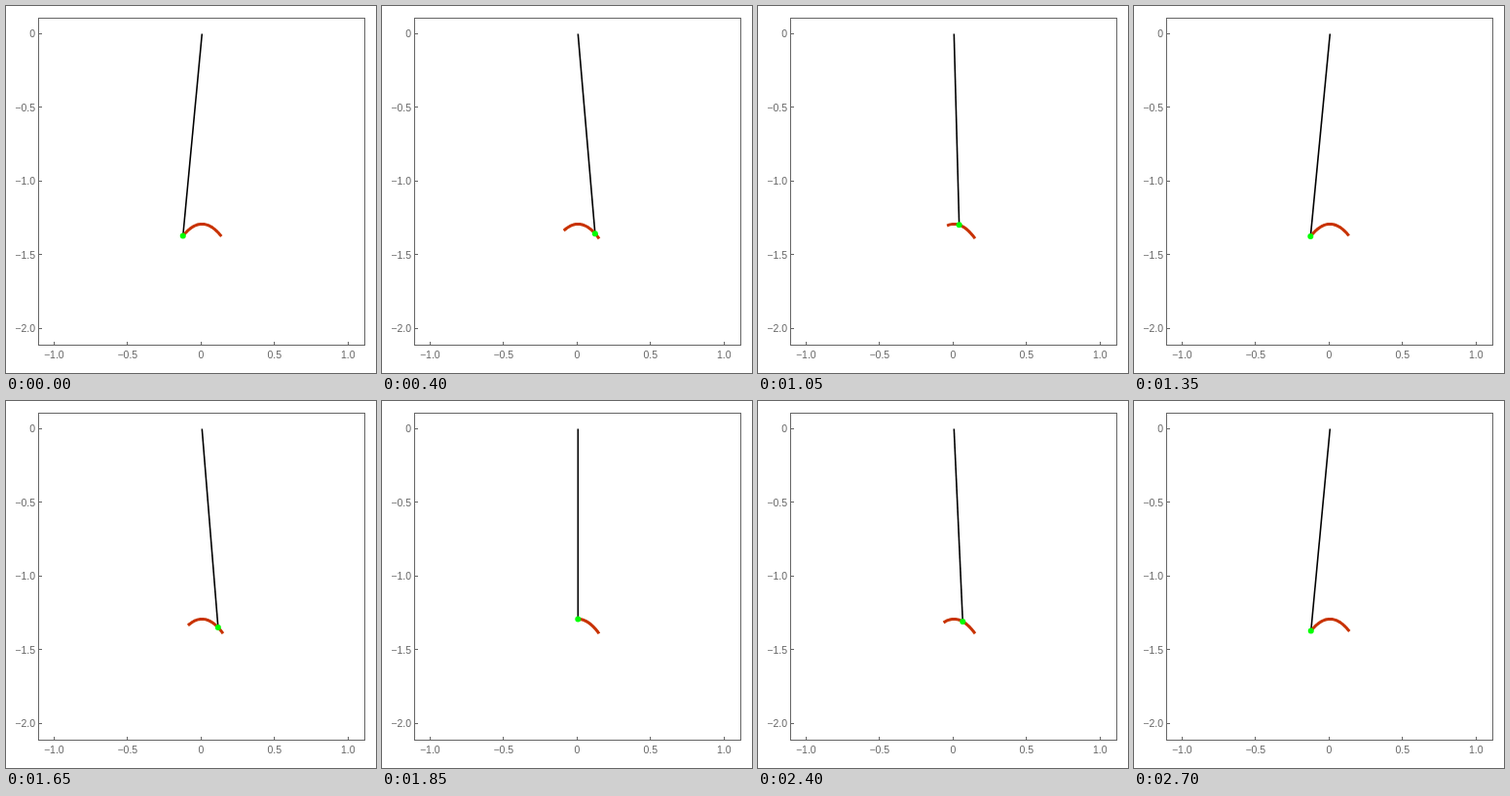
Recreate the animation shown at these times as an HTML page. Size 380 px wide and 376 px high, loop 3 s.

```html
<!DOCTYPE html>
<html lang="en">
<head>
<meta charset="utf-8">
<title>Elastic pendulum</title>
<style>
  html, body { margin: 0; width: 100%; height: 100%; overflow: hidden; background: #fff; }
  svg { display: block; width: 380px; height: 376px; }
  text { font: 10.5px "Liberation Sans", Arial, sans-serif; fill: #666; }
  .axis { fill: none; stroke: #666; stroke-width: 1; }
  .rod { stroke: #000; stroke-width: 1.6; }
  .trail { fill: none; stroke: #c83200; stroke-width: 3; }
  .bob { fill: #0f0; }
</style>
</head>
<body>
<svg viewBox="0 0 380 376">
  <rect class="axis" x="33.5" y="12.5" width="335" height="335"/>
  <g id="ticks"></g>
  <line class="rod" id="rod" x1="201.3" y1="28.5"/>
  <path class="trail" id="trail"/>
  <circle class="bob" id="bob" r="3"/>
</svg>
<script>
const $ = id => document.getElementById(id);
const LOOP = 3000, STEP = 50, HOLD = 300;
const PIVOT_X = 201.3, APEX_Y = 223.4, SWING = 21.6, BEND = 0.0317;

// [step, swing phase]; every step also adds half a swing
const keys = [[0, -2.01], [8, 0.826], [16, 2.893], [22, 4.325], [31, 6.283], [36, 7.438], [48, 10.556]];

function drawTicks() {
  const label = v => v === 0 ? "0" : v.toFixed(1).replace("-", "\u2212");
  let out = "";
  for (let i = -2; i <= 2; i++) {
    const x = 201 + i * 75.5;
    const px = Math.floor(x) - 0.5;
    out += `<path class="axis" d="M${px} 347v-3"/><text x="${x - 0.7}" y="360.5" text-anchor="middle">${label(i / 2)}</text>`;
  }
  for (let i = 0; i <= 4; i++) {
    const y = 29 + i * 75.5;
    out += `<path class="axis" d="M34 ${Math.floor(y) - 0.5}h3"/><text x="30" y="${y + 3}" text-anchor="end">${label(-i / 2)}</text>`;
  }
  $("ticks").innerHTML = out;
}

function stepAt(t) {
  if (t < HOLD) return 0;
  const n = Math.floor((t - HOLD) / STEP) + 1;
  return Math.min(48, n > 26 ? n - 1 : n); // one step lasts twice as long
}

function phaseAt(k) {
  const i = Math.max(1, keys.findIndex(p => p[0] >= k));
  const [k0, p0] = keys[i - 1], [k1, p1] = keys[i];
  return p0 + (p1 - p0) * (k - k0) / (k1 - k0) + k * Math.PI;
}

function place(phase) {
  const dx = SWING * Math.sin(phase);
  return [PIVOT_X + dx, APEX_Y + BEND * dx * dx];
}

function draw(t) {
  const phase = phaseAt(stepAt(t));
  const span = 2.77 + 0.47 * Math.cos(2 * (phase - 2.8));
  const pts = Array.from({ length: 61 }, (_, i) =>
    place(phase - span * (1 - i / 60)).map(v => v.toFixed(2)).join(" "));
  const [x, y] = place(phase);
  $("trail").setAttribute("d", "M" + pts.join("L"));
  $("rod").setAttribute("x2", x);
  $("rod").setAttribute("y2", y);
  $("bob").setAttribute("cx", x);
  $("bob").setAttribute("cy", y);
}

drawTicks();
const start = performance.now();
function tick() {
  draw((performance.now() - start) % LOOP);
  requestAnimationFrame(tick);
}
tick();
</script>
</body>
</html>
```
